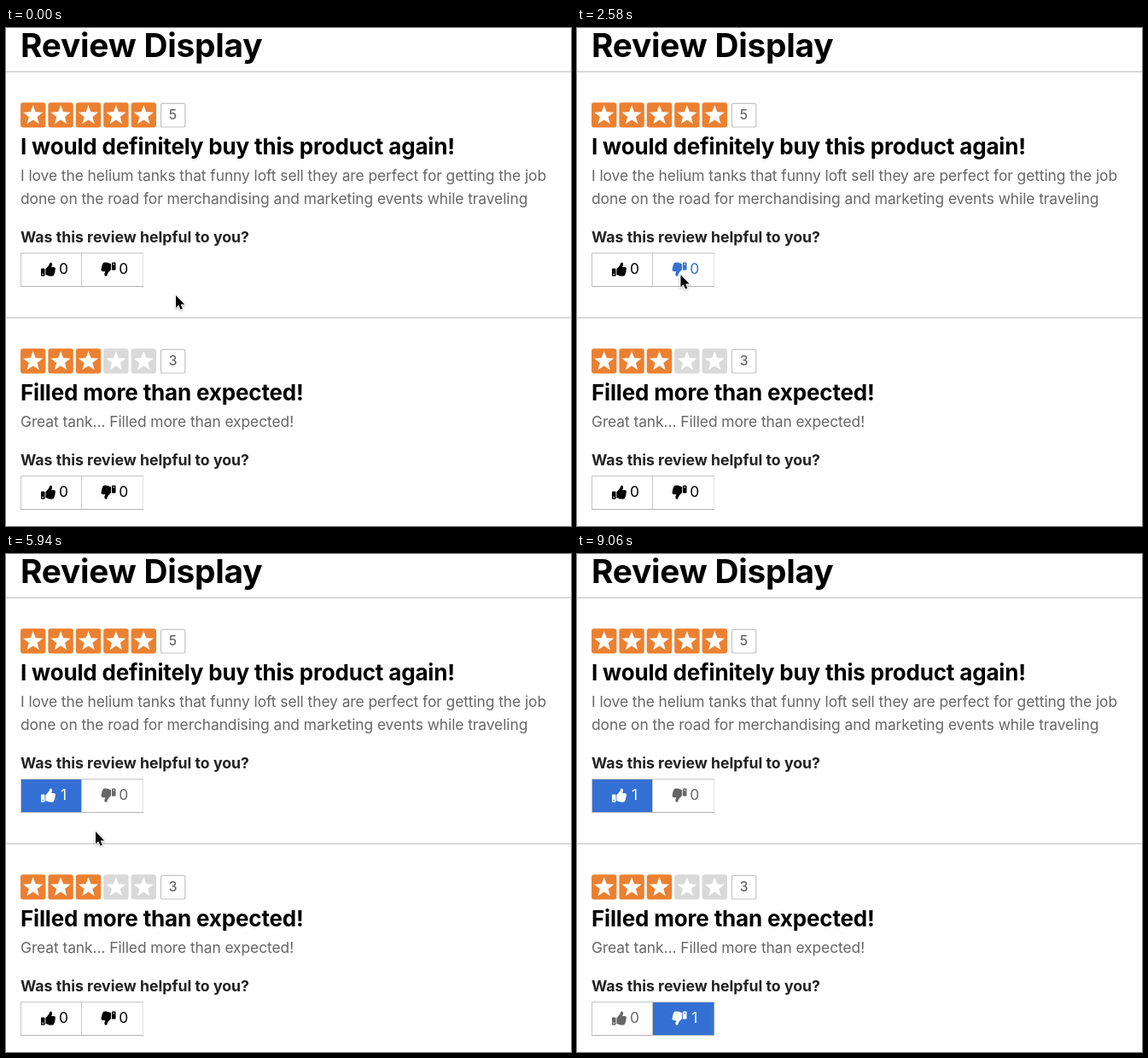
An HTML page with a canvas for the animation above (9.12 s loop, 662 by 583 pixels).

```html
<!DOCTYPE html>
<html lang="en">
<head>
<meta charset="utf-8">
<title>Review Display</title>
<style>
html, body { margin: 0; width: 100%; height: 100%; overflow: hidden; background: #fff; }
canvas { display: block; width: 662px; height: 583px; }
</style>
</head>
<body>
<canvas id="stage"></canvas>
<script>
const W = 662, H = 583, LOOP = 9120, STEP = 60;
const HOVER_LAG = 170, HIDE_AT = 8400;
const ORANGE = '#ec8031', EMPTY = '#d9d9d9', BLUE = '#3470d4', GRAY = '#666';
const FONT = 'Inter, "Open Sans", sans-serif';

const canvas = document.getElementById('stage');
const ctx = canvas.getContext('2d');
const dpr = window.devicePixelRatio || 1;
canvas.width = W * dpr;
canvas.height = H * dpr;

const cuff = new Path2D('M.7 7H3.8q.7 0 .7.7V15.3q0 .7-.7.7H.7q-.7 0-.7-.7V7.7Q0 7 .7 7Z M2.2 13.1a.75 .75 0 1 0 .01 0Z');
const hand = new Path2D('M5.4 7.4C8 5.5 8.8 3.7 9.7 2.6Q10 0 11 0C13.6 0 13.6 3 12.1 5.6H15.1Q17 5.8 17 7.5Q17 8.8 16.4 9.2Q16.9 10.8 16 11.7Q16.2 13.4 15.2 14.1Q15.2 16 13 16H11C8.6 16 7.5 14.6 5.4 14.6Z');
const arrow = new Path2D('M0 0V14.4L3.2 11.3L5.6 16.4L7.9 15.4L5.6 10.4H10.2Z');

const reviews = [
  { top: 51, rating: 5, title: 'I would definitely buy this product again!',
    lines: ['I love the helium tanks that funny loft sell they are perfect for getting the job',
            'done on the road for merchandising and marketing events while traveling'],
    asked: 251, buttons: 263, vote: 0, votedAt: 3900 },
  { top: 339, rating: 3, title: 'Filled more than expected!',
    lines: ['Great tank... Filled more than expected!'],
    asked: 512, buttons: 524, vote: 1, votedAt: 6540 }
];

// time, x, y of the pointer tip
const path = [
  [0, 199, 313], [600, 199, 313], [900, 119, 279], [1300, 121.5, 289],
  [2800, 121.5, 289], [3300, 56.5, 290], [5400, 56.5, 290], [5940, 105, 325],
  [6450, 120, 551], [6750, 120, 551], [7200, 118.5, 295], [LOOP, 118.5, 295]
];

function pointerAt(t) {
  t = Math.max(0, t);
  let i = 1;
  while (i < path.length - 1 && path[i][0] < t) i++;
  const [t0, x0, y0] = path[i - 1], [t1, x1, y1] = path[i];
  const p = Math.min(1, (t - t0) / (t1 - t0));
  const e = p * p * (3 - 2 * p);
  return { x: x0 + (x1 - x0) * e, y: y0 + (y1 - y0) * e };
}

function text(str, x, y, size, color, weight = 400, tracking = 0, align = 'left') {
  ctx.font = `${weight} ${size}px ${FONT}`;
  ctx.letterSpacing = `${(tracking * size).toFixed(3)}px`;
  ctx.textAlign = align;
  ctx.fillStyle = color;
  ctx.fillText(str, x, y);
}

function rect(x, y, w, h, color) {
  ctx.fillStyle = color;
  ctx.fillRect(x, y, w, h);
}

function roundBox(x, y, w, h, r) {
  ctx.beginPath();
  ctx.roundRect(x, y, w, h, r);
}

function star(cx, cy, r) {
  ctx.beginPath();
  for (let i = 0; i < 10; i++) {
    const a = -Math.PI / 2 + i * Math.PI / 5;
    const d = i % 2 ? r * 0.42 : r;
    ctx.lineTo(cx + d * Math.cos(a), cy + d * Math.sin(a));
  }
  ctx.closePath();
  ctx.fillStyle = '#fff';
  ctx.fill();
}

function rating(top, count) {
  for (let i = 0; i < 5; i++) {
    const x = 17 + i * 32.4, y = top + 36.2;
    roundBox(x, y, 29.4, 29.4, 3);
    ctx.fillStyle = i < count ? ORANGE : EMPTY;
    ctx.fill();
    star(x + 14.7, y + 15.3, 12.2);
  }
  roundBox(181.5, top + 37.3, 28.3, 27.7, 2);
  ctx.strokeStyle = '#c4c4c4';
  ctx.lineWidth = 1.2;
  ctx.stroke();
  text(count, 195.5, top + 56.3, 15.5, GRAY, 500, 0, 'center');
}

function thumb(cx, cy, color, down) {
  ctx.save();
  ctx.translate(cx, cy);
  if (down) ctx.rotate(Math.PI);
  ctx.translate(-8.5, -8);
  ctx.fillStyle = color;
  ctx.fill(cuff, 'evenodd');
  ctx.fill(hand);
  ctx.restore();
}

function voteButtons(review, t) {
  const y = review.buttons;
  const voted = t >= review.votedAt;
  const tip = pointerAt(t - HOVER_LAG);
  rect(17, y, 144, 40, '#c6c6c6');
  rect(17, y + 39, 144, 1, '#b4b4b4');
  [[18, 70], [89, 71.5]].forEach(([x, w], i) => {
    const chosen = voted && review.vote === i;
    const hover = tip.x > x && tip.x < x + w && tip.y > y && tip.y < y + 39;
    const color = chosen ? '#fff' : voted ? GRAY : hover ? BLUE : '#000';
    rect(x, y + 1, w, 38, chosen ? BLUE : '#fff');
    thumb(i ? 120 : 49.5, y + 19.5, color, i === 1);
    text(chosen ? 1 : 0, i ? 137.7 : 67.5, y + 25.3, 17.4, color, 400, 0, 'center');
  });
}

function drawReview(review, t) {
  const { top } = review;
  rect(0, top - 0.5, W, 1.3, '#c6c6c6');
  rating(top, review.rating);
  text(review.title, 17, top + 97, 26, '#000', 700, -0.0065);
  review.lines.forEach((line, i) => text(line, 17, top + 128.3 + i * 27, 17.4, GRAY, 400, -0.004));
  text('Was this review helpful to you?', 17, review.asked, 17.7, '#222', 700);
  voteButtons(review, t);
}

function drawPointer({ x, y }) {
  ctx.save();
  ctx.translate(x, y);
  ctx.shadowColor = 'rgba(0,0,0,.3)';
  ctx.shadowBlur = 3 * dpr;
  ctx.shadowOffsetY = dpr;
  ctx.lineWidth = 2;
  ctx.lineJoin = 'round';
  ctx.strokeStyle = '#fff';
  ctx.stroke(arrow);
  ctx.shadowColor = 'transparent';
  ctx.fillStyle = '#000';
  ctx.fill(arrow);
  ctx.restore();
}

function draw(t) {
  ctx.setTransform(dpr, 0, 0, dpr, 0, 0);
  rect(0, 0, W, H, '#fff');
  text('Review Display', 17, 33.7, 38.8, '#000', 700, -0.0055);
  reviews.forEach(review => drawReview(review, t));
  if (t < HIDE_AT) drawPointer(pointerAt(t));
}

const start = performance.now();
function tick() {
  const t = (performance.now() - start) % LOOP;
  draw(Math.floor(t / STEP) * STEP);
  requestAnimationFrame(tick);
}
tick();
</script>
</body>
</html>
```
